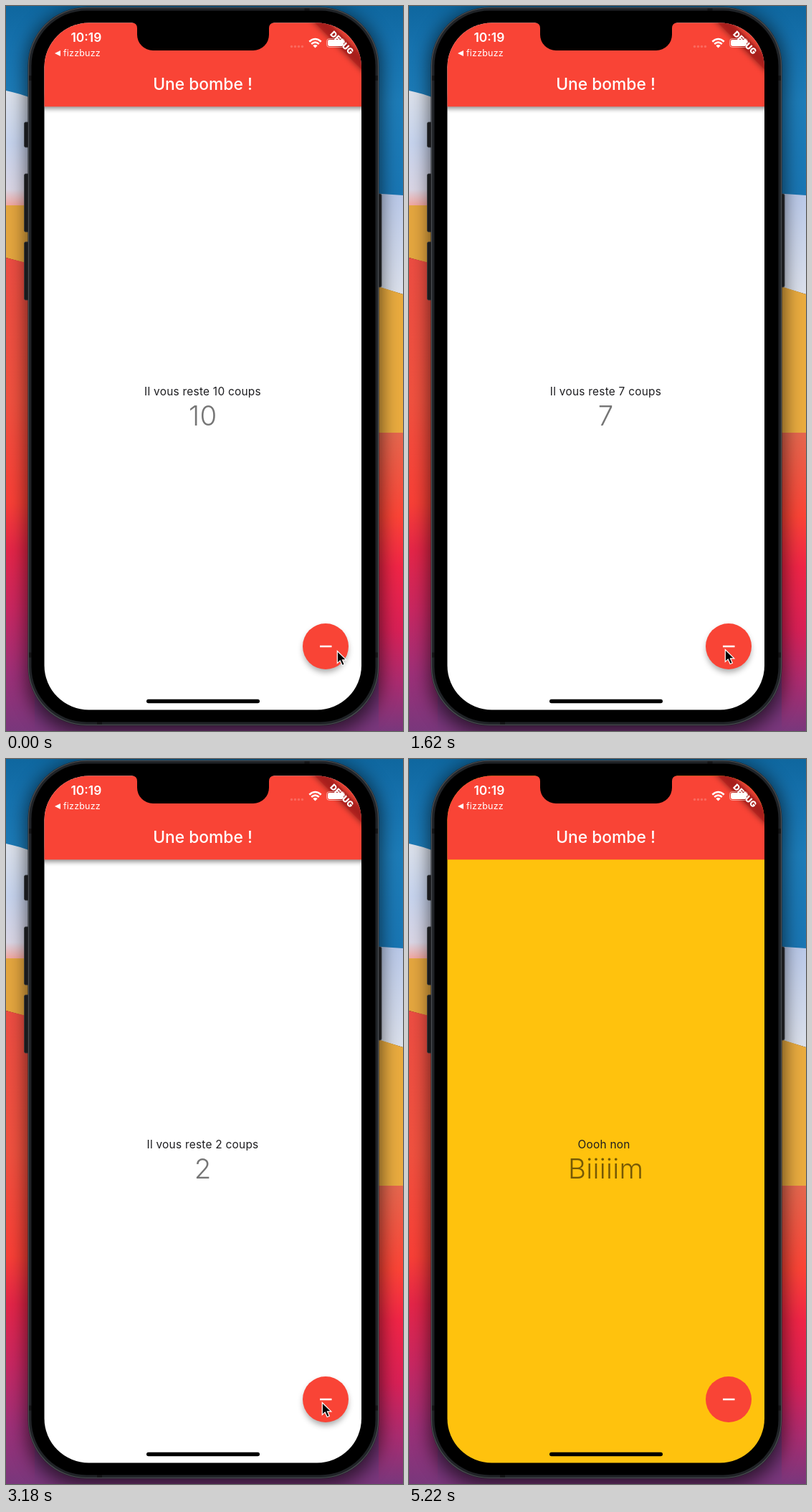
An HTML page for the animation above (5280 ms loop, 554 px wide and 1011 px high).

```html
<!DOCTYPE html>
<html lang="fr">
<head>
<meta charset="utf-8">
<title>Une bombe !</title>
<style>
  html, body { margin: 0; width: 100%; height: 100%; overflow: hidden; background: #000; }
  svg { display: block; width: 554px; height: 1011px; }
  text { font-family: Inter, Roboto, sans-serif; }
  .mid { text-anchor: middle; }
</style>
</head>
<body>
<svg viewBox="0 0 554 1011" xmlns="http://www.w3.org/2000/svg">
  <defs>
    <linearGradient id="sky" x2="0" y2="1">
      <stop offset="0" stop-color="#0f679f"/><stop offset=".2" stop-color="#1672ae"/>
      <stop offset=".45" stop-color="#1d7cb8"/><stop offset="1" stop-color="#1874b2"/>
    </linearGradient>
    <linearGradient id="cloudLeft" x2="0" y2="1">
      <stop offset="0" stop-color="#dce1ea"/><stop offset=".45" stop-color="#c6d3ed"/>
      <stop offset=".85" stop-color="#d9d5e4"/><stop offset="1" stop-color="#f3a39b"/>
    </linearGradient>
    <linearGradient id="cloudRight" x2="0" y2="1">
      <stop offset="0" stop-color="#b9c8e8"/><stop offset="1" stop-color="#dbe0eb"/>
    </linearGradient>
    <linearGradient id="sunsetLeft" gradientUnits="userSpaceOnUse" x1="0" y1="350" x2="0" y2="1011">
      <stop offset="0" stop-color="#ec4d42"/><stop offset=".3" stop-color="#f0513f"/>
      <stop offset=".52" stop-color="#f83f36"/><stop offset=".62" stop-color="#e42548"/>
      <stop offset=".75" stop-color="#c72762"/><stop offset=".88" stop-color="#9d3078"/>
      <stop offset="1" stop-color="#79377c"/>
    </linearGradient>
    <linearGradient id="sunsetRight" gradientUnits="userSpaceOnUse" x1="0" y1="595" x2="0" y2="1011">
      <stop offset="0" stop-color="#e5674e"/><stop offset=".28" stop-color="#fb4436"/>
      <stop offset=".45" stop-color="#f02546"/><stop offset=".66" stop-color="#d92056"/>
      <stop offset=".84" stop-color="#aa2c70"/><stop offset="1" stop-color="#79377c"/>
    </linearGradient>
    <filter id="blur14" x="-20%" y="-10%" width="140%" height="120%"><feGaussianBlur stdDeviation="13"/></filter>
    <filter id="blur4" x="-50%" y="-100%" width="200%" height="300%"><feGaussianBlur stdDeviation="4"/></filter>
    <filter id="blur3" x="-10%" y="-80%" width="120%" height="260%"><feGaussianBlur stdDeviation="3"/></filter>
    <clipPath id="screen"><rect x="53.500" y="23.500" width="442.500" height="958" rx="62"/></clipPath>
  </defs>

  <!-- wallpaper -->
  <rect width="554" height="300" fill="url(#sky)"/>
  <path d="M0 118Q16 121 40 130V280H0Z" fill="url(#cloudLeft)"/>
  <path d="M0 278H40V362L0 351Z" fill="#e4a63f"/>
  <path d="M0 351L40 361V1011H0Z" fill="url(#sunsetLeft)"/>
  <path d="M510 261L554 264V402L510 389Z" fill="url(#cloudRight)"/>
  <path d="M510 388L554 402V596H510Z" fill="#e9ab3f"/>
  <path d="M510 595H554V1011H510Z" fill="url(#sunsetRight)"/>
  <path d="M40 900H520V1011H40Z" fill="#79377c"/>
  <rect x="29" y="6" width="494" height="1008" rx="78" opacity=".62" filter="url(#blur14)"/>

  <!-- handset -->
  <g fill="#191a1c" stroke="#33363a" stroke-width=".8">
    <rect x="25.500" y="162" width="9" height="35" rx="2"/>
    <rect x="25.500" y="234" width="9" height="81" rx="2"/>
    <rect x="25.500" y="329" width="9" height="81" rx="2"/>
    <rect x="516" y="262" width="8" height="130" rx="2"/>
  </g>
  <rect x="30.500" y="1.500" width="490" height="1002" rx="82" fill="#202327"/>
  <rect x="31.500" y="2.500" width="488" height="1000" rx="81" fill="none" stroke="#4a4d51" stroke-width="1.200"/>
  <path d="M32 100.500H37M514 100.500H519M32 905H37M514 905H519M130.500 998V1002M420 3V8" stroke="#141517" stroke-width="7"/>
  <rect x="35.500" y="6.500" width="480" height="992" rx="77"/>

  <!-- app -->
  <g clip-path="url(#screen)">
    <rect id="page" x="53" y="23" width="444" height="959"/>
    <rect id="barShadow" x="43" y="125" width="463" height="18.500" opacity=".42" filter="url(#blur3)"/>
    <rect x="53" y="23" width="444" height="117.300" fill="#f94436"/>
    <text class="mid" x="274.500" y="117" font-size="22.800" font-weight="500" fill="#fff">Une bombe !</text>

    <g transform="translate(496 24) rotate(45)">
      <rect x="-60" y="31.800" width="120" height="13.600" opacity=".5" filter="url(#blur4)"/>
      <rect x="-60" y="31.800" width="120" height="13.600" fill="#b71c1c" opacity=".63"/>
      <text class="mid" y="42.600" font-size="11.600" font-weight="900" fill="#fff">DEBUG</text>
    </g>

    <g fill="#fff">
      <text x="90.500" y="50" font-size="17.400" font-weight="600">10:19</text>
      <path d="M68 66L76 62V70Z"/>
      <text x="80" y="70" font-size="12.500" letter-spacing=".2">fizzbuzz</text>
      <g opacity=".2">
        <circle cx="398.500" cy="56.500" r="1.700"/><circle cx="403.500" cy="56.500" r="1.700"/>
        <circle cx="408.500" cy="56.500" r="1.700"/><circle cx="413.500" cy="56.500" r="1.700"/>
      </g>
      <path d="M431.500 58.500L428.300 55.200Q431.500 52.600 434.700 55.200Z"/>
      <path d="M423.300 49.700Q431.500 42.300 439.700 49.700M426.200 53Q431.500 48.200 436.800 53" fill="none" stroke="#fff" stroke-width="2.500"/>
      <rect x="447.500" y="45.500" width="25" height="12" rx="3.800" fill="none" stroke="#fff" stroke-opacity=".5"/>
      <rect x="449" y="47" width="22" height="9" rx="2.400"/>
      <path d="M474 49.500Q476.500 51.500 474 53.500Z" opacity=".6"/>
    </g>

    <text id="label" class="mid" y="543" font-size="15.400" letter-spacing=".26" fill="#1d1d20"></text>
    <text id="count" class="mid" x="274.700" y="584.500" font-size="38.400" font-weight="350" letter-spacing=".28" fill-opacity=".54"></text>

    <circle id="buttonShadow" cx="446" r="31" opacity=".34" filter="url(#blur4)"/>
    <circle id="button" cx="446" cy="893" r="32" fill="#f94436"/>
    <g id="traces" fill="none" stroke="#d94a20">
      <circle cx="446" cy="893" r="31.500" stroke-width=".7" stroke-dasharray="1 5" opacity=".6"/>
      <path d="M456 863A32 32 0 0 1 476 885" stroke-width=".8"/>
    </g>
    <path d="M438 893H454.500" stroke="#fff" stroke-width="2.300"/>
    <rect x="196" y="966.800" width="158" height="5.500" rx="2.750"/>
  </g>
  <path d="M176 23Q183 24 183 31V40A22 22 0 0 0 205 62H345A22 22 0 0 0 367 40V31Q367 24 374 23Z"/>

  <!-- pointer -->
  <g id="ring" fill="none">
    <circle cx="441" cy="898.500" r="25.900" stroke="#fff" opacity=".7"/>
    <circle cx="441" cy="898.500" r="24.700" stroke="#000" stroke-width="1.700"/>
  </g>
  <path id="cursor" d="M0 0V17L3.900 13.400L6.900 20L10 18.700L7.200 12.300H12.500Z" stroke="#fff" stroke-width="1.200"/>
</svg>
<script>
  const LOOP = 5280, STEP = 60, PRESS = 120;
  const taps = [720, 1080, 1440, 1800, 2220, 2520, 2820, 3180, 3540, 3960];
  const boom = taps[taps.length - 1];
  const buttonBack = boom + 120, pointerGone = 4860;
  const moveStart = 300, moveEnd = 540;
  const get = id => document.getElementById(id);
  const show = (id, on) => get(id).setAttribute('visibility', on ? 'visible' : 'hidden');

  function setText(id, value) {
    if (get(id).textContent !== value) get(id).textContent = value;
  }

  function draw(t) {
    const left = taps.filter(tap => t < tap).length;
    const exploded = left === 0;
    const flash = exploded && t < buttonBack;
    const pressed = taps.some(tap => t >= tap - PRESS && t < tap);

    get('page').setAttribute('fill', exploded ? '#ffc20d' : '#fff');
    get('label').setAttribute('x', exploded ? 272 : 274.5);
    setText('label', exploded ? 'Oooh non' : `Il vous reste ${left} coups`);
    setText('count', exploded ? 'Biiiiim' : String(left));

    show('barShadow', !exploded);
    show('buttonShadow', !exploded);
    get('buttonShadow').setAttribute('cy', pressed ? 901 : 898);
    show('button', !flash);
    show('traces', flash);
    show('ring', pressed);
    show('cursor', t < pointerGone);

    const p = Math.min(1, Math.max(0, (t - moveStart + STEP) / (moveEnd - moveStart)));
    const ease = p * p * (3 - 2 * p);
    get('cursor').setAttribute('transform', `translate(${462.3 - 21 * ease} ${899.5 - 2 * ease})`);
  }

  const start = performance.now();
  function tick() {
    const t = (performance.now() - start) % LOOP;
    draw(Math.floor(t / STEP) * STEP);
    requestAnimationFrame(tick);
  }
  draw(0);
  requestAnimationFrame(tick);
</script>
</body>
</html>
```
